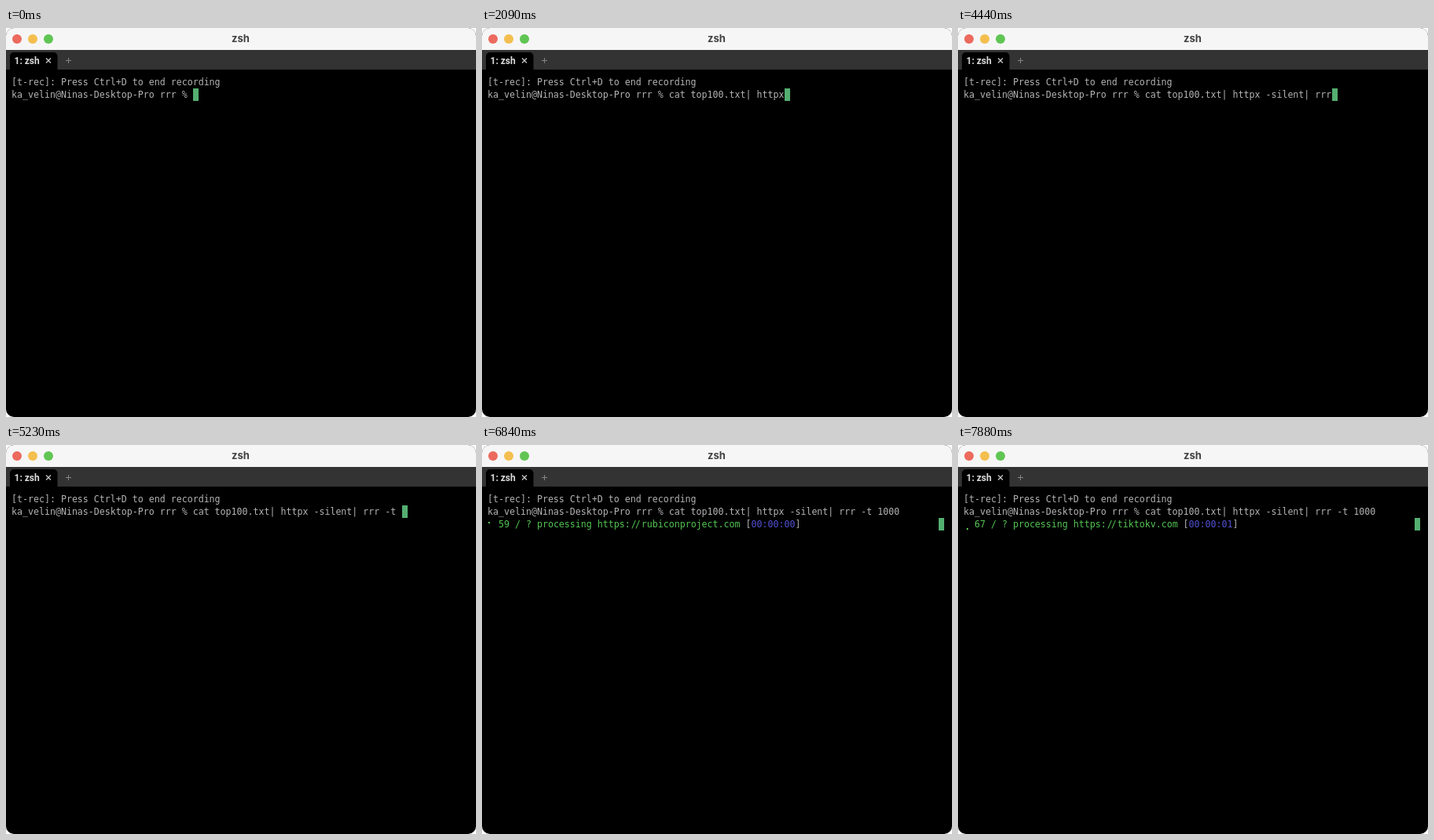
Animation, 598 px wide and 496 px high, one loop 8 s. Source, as an HTML page:

```html
<!DOCTYPE html>
<html lang="en">
<head>
<meta charset="utf-8">
<title>zsh</title>
<style>
  html, body { margin: 0; width: 100%; height: 100%; overflow: hidden; background: #fff; }
  #win { position: absolute; left: 0; top: 0; width: 598px; height: 496px; overflow: hidden; border-radius: 10px; background: #000; }
  svg { position: absolute; left: 0; top: 0; }
  .row { position: absolute; left: 7px; height: 16px; line-height: 16px; white-space: pre; color: #b4b4b4;
         font-family: "DejaVu Sans Mono", monospace; font-size: 11.627px; font-variant-ligatures: none; }
  .go { color: #54c554; }
  .time { color: #5252d6; }
  .slash { position: relative; }
  #cursor { position: absolute; width: 7px; height: 16px; background: #54ae71; }
  .dot { position: absolute; width: 2px; height: 2px; background: #54c554; }
</style>
</head>
<body>
<div id="win">
  <svg width="598" height="54" viewBox="0 0 598 54">
    <rect width="598" height="28" fill="#f6f6f6"/>
    <rect y="28" width="598" height="25" fill="#333"/>
    <path d="M5 53V36a5 5 0 0 1 5-5H60.500a5 5 0 0 1 5 5V53Z" fill="#000"/>
    <circle cx="14" cy="14" r="6" fill="#ec6a5e"/>
    <circle cx="34" cy="14" r="6" fill="#f4bf4f"/>
    <circle cx="54" cy="14" r="6" fill="#61c554"/>
    <text x="298.500" y="18" text-anchor="middle" font-family="Inter, sans-serif" font-size="13" font-weight="700" fill="#404040">zsh</text>
    <text x="10.500" y="46" font-family="Roboto, sans-serif" font-size="12" font-weight="700" fill="#dcdcdc">1: zsh</text>
    <path d="M51 38.500l6 6m0-6l-6 6" stroke="#d0d0d0" stroke-width="1.100"/>
    <path d="M76 41.500h7m-3.500-3.500v7" stroke="#858585"/>
  </svg>
  <div class="row" style="top:61px">[t-rec]: Press Ctrl+D to end recording</div>
  <div id="cursor"></div>
  <div class="row" id="prompt" style="top:77px"></div>
  <div class="row" id="status" style="top:93px"></div>
  <div id="spinner"></div>
</div>
<script>
const LOOP = 8000, COL = 7, LEFT = 7;
const PROMPT = 'ka_velin@Ninas-Desktop-Pro rrr % ';
const COMMAND = 'cat top100.txt| httpx -silent| rrr -t 1000';

// [time, characters typed]
const TYPING = [
  [0, 0], [250, 1], [510, 3], [770, 4], [1040, 7], [1310, 14], [1570, 16], [1830, 18], [2090, 21],
  [2350, 22], [2610, 23], [2880, 25], [3140, 27], [3400, 29],
  [3660, 30], [3920, 31], [4180, 32], [4440, 34],
  [4710, 35], [4970, 37], [5230, 38], [5490, 40], [5750, 42]
];

// [time, braille dots, count, host, seconds]
const RUN = [
  [6010, []],
  [6270, [6], 0, '', 0],
  [6530, [3, 6], 0, '', 0],
  [6840, [1], 59, 'rubiconproject.com', 0],
  [7100, [1, 4], 61, 'w3.org', 0],
  [7360, [2, 5], 63, 'wikipedia.org', 0],
  [7620, [3, 6], 65, 'mozilla.org', 1],
  [7880, [6], 67, 'tiktokv.com', 1]
];

const $ = id => document.getElementById(id);
const span = (cls, text) => `<span class="${cls}">${text}</span>`;
const at = (steps, t) => steps.filter(s => s[0] <= t).pop();
const SLASHES = '<span class="slash" style="left:1px">/</span><span class="slash" style="left:-1px">/</span>';

function statusLine([, , count, host, sec]) {
  if (sec === undefined) return '';
  const msg = count ? span('go', `${count} / ? processing https:${SLASHES}${host}`) : '';
  return `  ${msg} [${span('time', '00:00:0' + sec)}]`;
}

// Braille dots 1-3 fill the left column, 4-6 the right one.
function dotMark(n) {
  const x = n > 3 ? 11 : 8, y = 98 + (n - 1) % 3 * 4;
  return `<i class="dot" style="left:${x}px;top:${y}px"></i>`;
}

function moveCursor(col, row) {
  $('cursor').style.left = LEFT + col * COL + 'px';
  $('cursor').style.top = 61 + row * 16 + 'px';
}

let shown = '';
function draw(t) {
  const typed = at(TYPING, t)[1], run = at(RUN, t);
  const key = typed + ':' + (run ? run[0] : '');
  if (key === shown) return;
  shown = key;
  $('prompt').textContent = PROMPT + COMMAND.slice(0, typed);
  $('status').innerHTML = run ? statusLine(run) : '';
  $('spinner').innerHTML = run ? run[1].map(dotMark).join('') : '';
  if (!run) moveCursor(PROMPT.length + typed, 1);
  else moveCursor(run.length > 2 ? 82 : 0, 2);
}

const start = performance.now();
function tick() {
  draw((performance.now() - start) % LOOP);
  requestAnimationFrame(tick);
}
tick();
</script>
</body>
</html>
```
